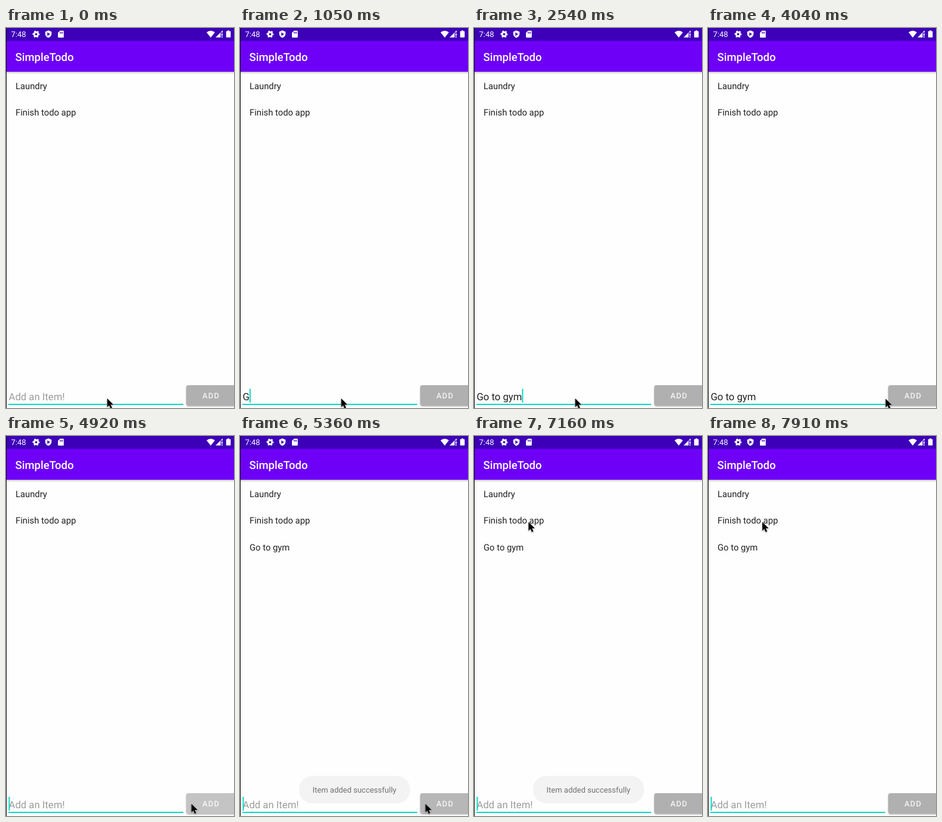
Animation of 382 by 634 pixels, one loop 8 s. Source, as an HTML page:

```html
<!DOCTYPE html>
<html lang="en">
<head>
<meta charset="utf-8">
<title>SimpleTodo</title>
<style>
html, body { margin: 0; width: 100%; height: 100%; overflow: hidden; background: #fefefe; }
svg { display: block; }
text { font-family: Roboto, sans-serif; text-rendering: geometricPrecision; white-space: pre; }
.row { font-size: 14.8px; fill: #212121; }
</style>
</head>
<body>
<svg width="382" height="634" viewBox="0 0 382 634">
  <defs>
    <linearGradient id="shade" x2="0" y2="1">
      <stop stop-opacity=".22"/><stop offset="1" stop-opacity="0"/>
    </linearGradient>
    <filter id="soft" x="-20%" y="-30%" width="140%" height="180%">
      <feDropShadow dx="0" dy="1.2" stdDeviation="1.1" flood-opacity=".35"/>
    </filter>
  </defs>
  <rect width="382" height="634" fill="#fefefe"/>
  <rect y="73" width="382" height="4" fill="url(#shade)"/>
  <rect y="21" width="382" height="52" fill="#6e00f8"/>
  <rect width="382" height="21.5" fill="#3d00b8"/>

  <g fill="#fff">
    <text x="8.5" y="15" font-size="13">7:48</text>
    <g fill="none" stroke="#fff">
      <circle cx="50.5" cy="10.3" r="3.3" stroke-width="2.8"/>
      <circle cx="50.5" cy="10.3" r="5" stroke-width="2" stroke-dasharray="2.8 2.436" stroke-dashoffset="1.4"/>
    </g>
    <path fill-rule="evenodd" d="M71 4l5.3 2.2v3.6c0 3-2.2 5.6-5.3 6.6c-3.1-1-5.3-3.6-5.3-6.6V6.2zM69.3 7.2v6l4.6-3z"/>
    <path fill-rule="evenodd" d="M90.6 4.5h5a1.2 1.2 0 0 1 1.2 1.2v9a1.2 1.2 0 0 1-1.2 1.2h-7.4a1.2 1.2 0 0 1-1.2-1.2V8.1zM90 6.8v2.5h1.2V6.8zM92 6.8v2.5h1.2V6.8zM94 6.8v2.5h1.2V6.8z"/>
    <path d="M343 16L336 7.2Q343 1.6 350 7.2z"/>
    <path d="M363 4v3.6h-3.4V15.800h-8.400zM361 9h1.800v4h-1.800zM361 14h1.800v1.800h-1.800z"/>
    <path d="M371.300 4h2.600v1.200h1.700a.8.8 0 0 1 .8.800v9a.8.8 0 0 1-.8.800h-6a.8.8 0 0 1-.8-.8v-9a.8.8 0 0 1 .8-.8h1.700z"/>
    <text x="15.500" y="54.500" font-size="18.500" font-weight="500">SimpleTodo</text>
  </g>

  <text class="row" x="16" y="101.500">Laundry</text>
  <text class="row" x="16" y="146.200">Finish todo app</text>
  <text class="row" id="item" x="16" y="191">Go to gym</text>

  <text id="entry" x="4.500" y="620.500" font-size="16.700"></text>
  <rect x="4" y="627" width="293" height="2" fill="#08d9c4"/>
  <rect id="caret" y="602" width="2" height="23" fill="#08d9c4"/>

  <rect x="302" y="596" width="90" height="34" rx="3.700" fill="#b0b0b0" filter="url(#soft)"/>
  <text x="329" y="618" font-size="13" font-weight="500" letter-spacing="1.160" fill="#f4f4f4">ADD</text>
  <rect id="ripple" x="302" y="596" width="90" height="34" rx="3.700" fill="#fff"/>

  <g id="toast">
    <rect x="99" y="567" width="186" height="46" rx="22" fill="#efefef"/>
    <text x="121.500" y="595.300" font-size="13" fill="#2b2b2b">Item added successfully</text>
  </g>

  <rect width="1" height="634" fill="#0a0a0a"/>
  <path id="mouse" d="M0 0v14.500l3.300-3.100 2.300 5.300 2.600-1.100-2.300-5.200h4.700z" stroke="#fff" stroke-width="1" paint-order="stroke"
    style="filter: drop-shadow(0 1px 1px rgba(0,0,0,.35))"/>
</svg>
<script>
const LOOP = 8000, TICK = 149;
const el = id => document.getElementById(id);
const [item, entry, caret, ripple, toast, mouse] =
  ['item', 'entry', 'caret', 'ripple', 'toast', 'mouse'].map(el);

const typed = [[0, ''], [7, 'G'], [9, 'Go'], [10, 'Go '], [11, 'Go t'], [12, 'Go to '],
  [14, 'Go to g'], [15, 'Go to gy'], [17, 'Go to gym'], [33, '']];
const blinks = [1, 4, 7, 20, 24, 27, 30, 37, 40, 43, 47, 50, 53];
const path = [[0, 169.5, 618], [25, 169.5, 618], [27, 297.5, 618.5], [31, 310.5, 613.5], [36, 310.5, 613.5],
  [38, 247, 111], [39, 247, 111], [41, 112.5, 142.500], [46, 92, 143.500], [49, 91, 143.500], [54, 91, 143.500]];

const ramp = (n, from, to) => Math.min(1, Math.max(0, (n - from) / (to - from)));

function mouseAt(n) {
  const i = path.findIndex(p => p[0] > n), a = path[i - 1], b = path[i];
  const k = ramp(n, a[0], b[0]);
  return [1, 2].map(j => a[j] + (b[j] - a[j]) * k);
}

function draw(ms) {
  const n = Math.floor(ms % LOOP / TICK);
  const word = typed.filter(k => k[0] <= n).pop()[1];
  entry.textContent = word || 'Add an Item!';
  entry.setAttribute('fill', word ? '#212121' : '#9c9c9c');
  caret.setAttribute('x', 4.5 + (word ? entry.getComputedTextLength() : 0));
  caret.setAttribute('opacity', blinks.filter(b => b <= n).length % 2);
  item.setAttribute('opacity', ramp(n, 33, 35));
  ripple.setAttribute('opacity', n < 33 ? 0 : .25 * (1 - ramp(n, 33, 36)));
  toast.setAttribute('opacity', ramp(n, 33, 36) * (1 - ramp(n, 47, 50)));
  mouse.setAttribute('transform', `translate(${mouseAt(n)})`);
}

const start = performance.now();
function loop() {
  draw(performance.now() - start);
  requestAnimationFrame(loop);
}
loop();
</script>
</body>
</html>
```
